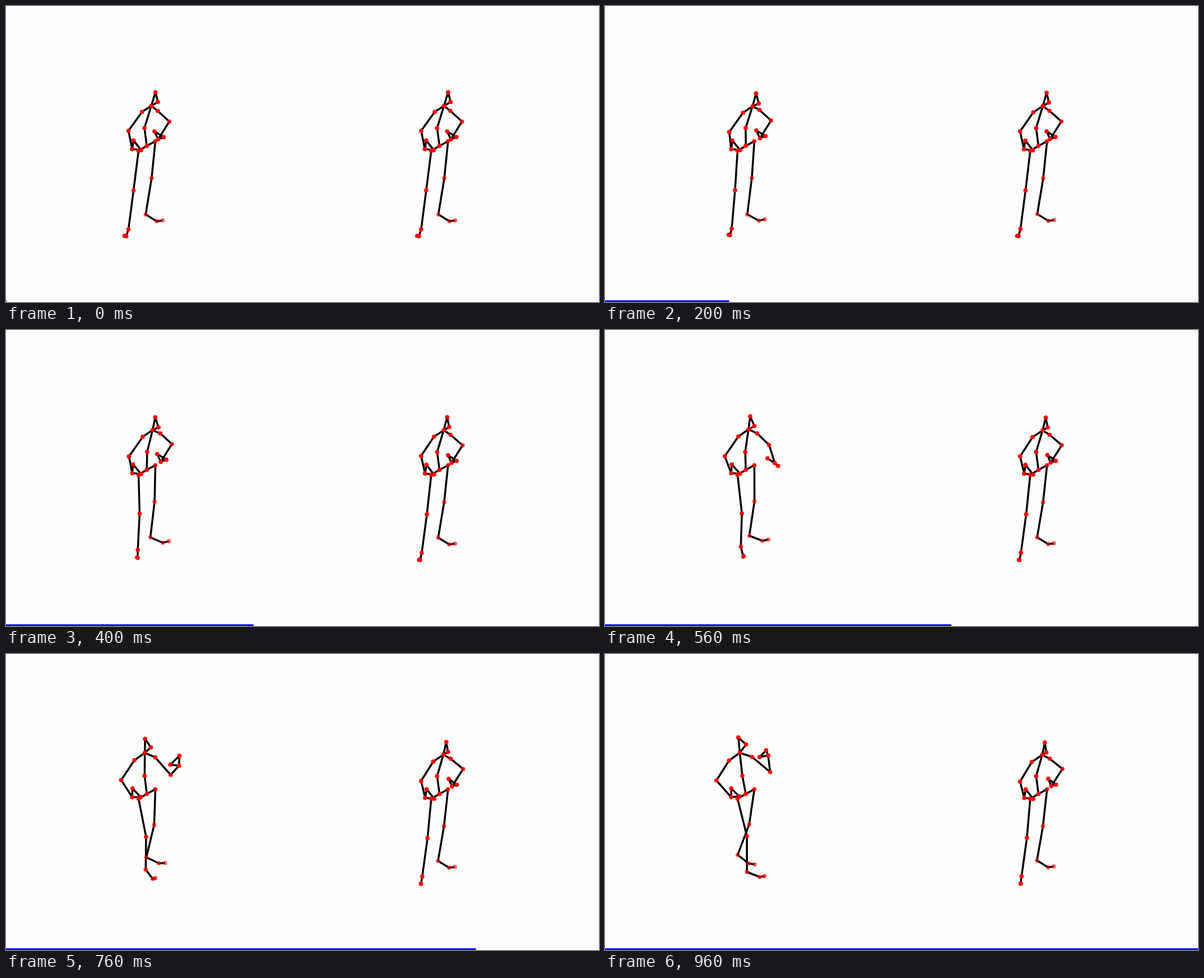
Write an HTML page with a canvas that moves like this. It is 1058 px wide and 529 px high and loops after 1000 ms.

```html
<!DOCTYPE html>
<html lang="en">
<head>
<meta charset="utf-8">
<title>Two walking skeletons</title>
<style>
  html, body { margin: 0; width: 100%; height: 100%; overflow: hidden; background: #fefefe; }
  canvas { display: block; }
</style>
</head>
<body>
<canvas id="stage" width="1058" height="529"></canvas>
<script>
const ctx = document.getElementById('stage').getContext('2d');
const STEP_MS = 40, STEPS = 25;
const STILL = [0, 0];

const mix = (a, b, u) => a + (b - a) * u;
const clamp = u => Math.max(0, Math.min(1, u));
const smooth = u => u * u * (3 - 2 * u);
const polar = (length, degrees) => {
  const angle = degrees * Math.PI / 180;
  return [length * Math.cos(angle), length * Math.sin(angle)];
};

// Offset from the parent joint: steady travel, plus a half and a full sine swing.
const glide = (start, travel = STILL, arc = STILL, wave = STILL) => u =>
  start.map((from, axis) => from + travel[axis] * u
    + arc[axis] * Math.sin(Math.PI * u) + wave[axis] * Math.sin(2 * Math.PI * u));

// The throwing arm: idle at first, then one quick swing with foreshortening.
function throwing(u) {
  const time = clamp((u * 24 - 10) / 13), swing = smooth(time);
  return { time, swing, whip: swing ** 2, squash: Math.sin(Math.PI * swing ** 2) };
}
const upperArm = u => {
  const { whip, squash } = throwing(u);
  return [20.7 + 11.5 * whip, 19 + 8 * whip + 8 * squash];
};
const forearm = u => {
  const { swing, squash } = throwing(u);
  return polar(mix(37.5, 30, swing) - 10 * squash, mix(122, -97, swing));
};
const thumb = u => polar(15.6, mix(245, 169, throwing(u).time ** .75));
const fingers = u => {
  const { time } = throwing(u);
  return [mix(10, -3.6, time), mix(-4, -9, time) + 11 * Math.sin(2 * Math.PI * time)];
};

// offset moves the left figure; the right one drifts slowly from the same first pose.
// fade: dot opacity at the start and end of the loop.
const joints = [];
function joint(name, parent, offset, drift = STILL, fade = [1, 1]) {
  joints.push({ name, parent, offset, drift, fade });
}

joint('pelvis', null, glide([251.2, 250]));
joint('spine', 'pelvis', glide([-4.2, -32], [-2, -.4], [5.2, 0], [1.3, 0]));
joint('neck', 'spine', glide([12.2, -39.5], [-16.7, -1.6], [4, .8], [1.1, .8]), [-1.3, 1.8]);
joint('crown', 'neck', glide([7.4, -24.3], [-10, -3], [1.6, 2.8]), [-2.8, 2.2]);
joint('face', 'neck', glide([11.8, -7], [-.7, -7.9], [-.9, 5.7]), [-4.5, 2.7]);

joint('shoulderA', 'neck', glide([-16.5, 10.8], [-2.6, 3]), [-2.2, 1.9]);
joint('elbowA', 'shoulderA', glide([-24.2, 33.7], [1.6, 2], [-1, .5]), [3.3, 1.3]);
joint('wristA', 'pelvis', glide([-26.1, 5.8]), [.8, 1.5]);
joint('thumbA', 'wristA', glide([2.5, -15.5], [-2.3, 0]));
joint('fingersA', 'wristA', glide([16, 1.8], [-1.5, -3.2], [.6, 1]));

joint('shoulderB', 'neck', glide([11.5, 9], [10.5, -1.5], [-2.2, -1.8], [0, -1.3]), [1.9, -2.2], [.85, .95]);
joint('elbowB', 'shoulderB', upperArm, [1.9, -.8], [.7, .85]);
joint('wristB', 'elbowB', forearm, [0, -1], [.95, 1]);
joint('thumbB', 'wristB', thumb, [1, 1], [.87, 1]);
joint('fingersB', 'wristB', fingers, [-1.6, 1.5]);

joint('hipA', 'pelvis', glide([-14.7, 8.7]), STILL, [.93, .93]);
joint('kneeA', 'hipA', glide([-9, 70.9], [25.7, -4.3], [1, .7], [-1.5, 0]), [3, -.9], [.95, .86]);
joint('ankleA', 'kneeA', glide([-9, 69.4], [9, -5.2], [2, -5], [0, 3.8]), [-.5, -.9], [1, .6]);
joint('ballA', 'ankleA', glide([-3.9, 12.5], [26.7, -3.5], [-7.7, 5.5], [0, -3.7]), [2.2, .9], [1, .6]);
joint('toeA', 'ballA', glide([-3.1, -.7], [11.5, -.8], [-2.8, 0]), [3.3, .6], [1, .6]);

joint('hipB', 'pelvis', glide([15.3, -8.4]), STILL, [.75, .75]);
joint('kneeB', 'hipB', glide([-6.7, 66.1], [-2.5, -3.3], [7.6, .5], [-2, 0]), [-.7, 0], [.6, .6]);
joint('ankleB', 'kneeB', glide([-10.6, 64.9], [-10, -10.3], [7.5, 3], [0, .6]), [0, -3.5], [.52, .52]);
joint('ballB', 'ankleB', glide([19.8, 12.1], [-.5, 3.1], [3.3, -4.5], [-1, 1.2]), STILL, [.5, .5]);
joint('toeB', 'ballB', glide([10.3, -1.5], [1, 3.3], [0, -2.8]), STILL, [.47, .47]);

const bones = [
  'pelvis spine neck',
  'neck crown face neck',
  'neck shoulderA elbowA wristA thumbA fingersA wristA',
  'neck shoulderB elbowB wristB thumbB fingersB wristB',
  'pelvis hipA kneeA ankleA ballA toeA',
  'pelvis hipB kneeB ankleB ballB toeB',
].map(chain => chain.split(' '));

const lively = ({ offset }, u) => offset(u);
const drifting = ({ offset, drift }, u) => offset(0).map((from, axis) => from + drift[axis] * u);

function drawFigure(left, offsetOf, u, fadeAmount) {
  const pose = {};
  for (const part of joints) {
    const [dx, dy] = offsetOf(part, u);
    const base = pose[part.parent] || { x: left, y: 0 };
    pose[part.name] = { x: base.x + dx, y: base.y + dy, alpha: mix(...part.fade, fadeAmount) };
  }

  ctx.strokeStyle = '#000';
  ctx.lineWidth = 3.5;
  ctx.lineJoin = 'round';
  for (const chain of bones) {
    ctx.beginPath();
    for (const name of chain) ctx.lineTo(pose[name].x, pose[name].y);
    ctx.stroke();
  }

  ctx.fillStyle = ctx.strokeStyle = '#f00';
  ctx.lineWidth = 1.4;
  for (const { x, y, alpha } of Object.values(pose)) {
    ctx.globalAlpha = alpha;
    ctx.beginPath();
    ctx.arc(x, y, 3.15, 0, 2 * Math.PI);
    ctx.fill();
    ctx.stroke();
  }
  ctx.globalAlpha = 1;
}

function draw() {
  const step = Math.floor(performance.now() / STEP_MS) % STEPS;
  const u = step / (STEPS - 1);
  ctx.fillStyle = '#fefefe';
  ctx.fillRect(0, 0, 1058, 529);
  drawFigure(0, lively, u, u);
  drawFigure(522.2, drifting, u, u / 4);
  ctx.fillStyle = '#00f';
  ctx.fillRect(0, 526, 1058 * u + .8, 3);
  requestAnimationFrame(draw);
}
draw();
</script>
</body>
</html>
```
